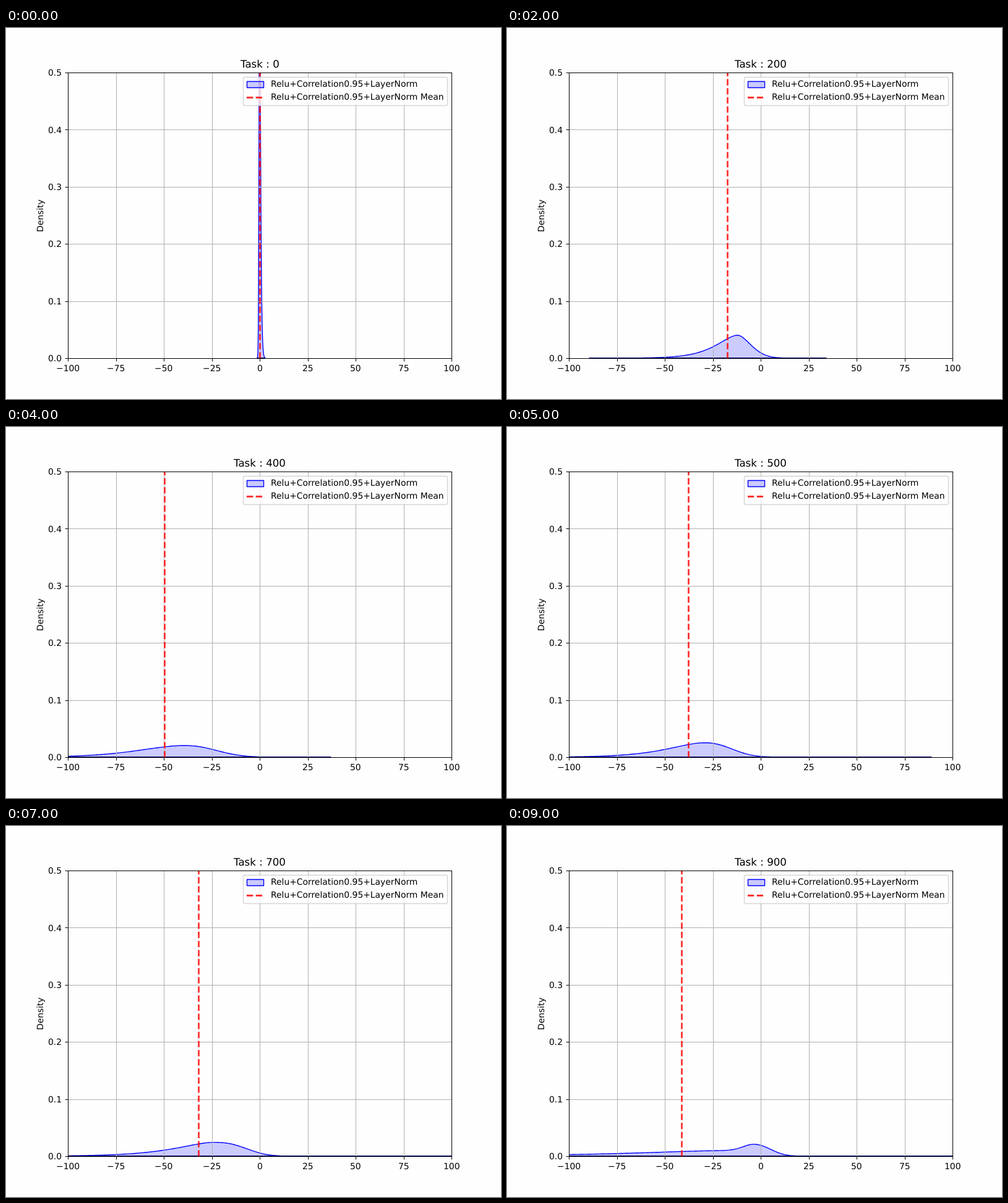
An HTML page that plays this animation: 800x600 px, repeating every 10 s.

```html
<!DOCTYPE html>
<html lang="en">
<head>
<meta charset="utf-8">
<title>Density by task</title>
<style>
  html, body { margin: 0; width: 100%; height: 100%; overflow: hidden; background: #fefefe; }
  svg { display: block; width: 800px; height: 600px; }
  text { font: 13.89px "DejaVu Sans", sans-serif; text-rendering: geometricPrecision; }
  #title { font-size: 16.67px; }
  #grid { stroke: #b0b0b0; }
  #ticks, #frame { stroke: #000; fill: none; }
  .density { fill: rgba(0, 0, 255, .2); stroke: #00f; stroke-width: 1.39; stroke-linejoin: round; }
  .mean { stroke: rgba(255, 0, 0, .8); stroke-width: 2.78; stroke-dasharray: 10.28 4.44; }
  #floor { stroke: #00006a; }
  #box { fill: #fefefe; stroke: #ccc; stroke-width: 1.39; opacity: .8; }
</style>
</head>
<body>
<svg viewBox="0 0 800 600">
  <clipPath id="plot"><rect x="100" y="72" width="620" height="462"/></clipPath>
  <g clip-path="url(#plot)"><path id="curve" class="density"/><path id="floor"/></g>
  <path id="grid"/>
  <path id="ticks"/>
  <g clip-path="url(#plot)"><path id="mean" class="mean"/></g>
  <rect id="frame" x="100.5" y="72.5" width="620" height="462"/>
  <g id="labels"></g>
  <text id="title" y="64"></text>
  <g transform="translate(60 330) rotate(-90)"><text>Density</text></g>
  <rect id="box" x="383.5" y="79.5" width="330" height="46" rx="2.8"/>
  <rect class="density" x="389.5" y="86.5" width="27" height="10"/>
  <path class="mean" d="M389 112.5H416.7"/>
  <text x="428" y="95">Relu+Correlation0.95+LayerNorm</text>
  <text x="428" y="116">Relu+Correlation0.95+LayerNorm Mean</text>
</svg>
<script>
const $ = id => document.getElementById(id);
const BASE = 534;
const crisp = v => Math.floor(v + .5) + .5;

// Aligns text around x (.5 centres, 1 right-aligns) and starts it on a whole pixel.
function align(el, x, share) {
  el.setAttribute('x', Math.round(x - share * el.getComputedTextLength()));
}

function addLabel(content, x, y, share) {
  const el = document.createElementNS('http://www.w3.org/2000/svg', 'text');
  el.textContent = content;
  el.setAttribute('y', y);
  $('labels').append(el);
  align(el, x, share);
}

function drawAxes() {
  let grid = '', ticks = '';
  for (let i = 0; i <= 8; i++) {
    const x = 100 + 77.5 * i;
    if (i % 8) grid += `M${crisp(x)} 72V534`;
    ticks += `M${crisp(x)} 534.5v4.9`;
    addLabel(String(25 * i - 100).replace('-', '\u2212'), x, 555, .5);
  }
  for (let i = 0; i <= 5; i++) {
    const y = BASE - 92.4 * i;
    if (i % 5) grid += `M100 ${crisp(y)}H720`;
    ticks += `M100.5 ${crisp(y)}h-4.9`;
    addLabel((i / 10).toFixed(1), 90.3, Math.round(y + 5.2), 1);
  }
  $('grid').setAttribute('d', grid);
  $('ticks').setAttribute('d', ticks);
}

// A skewed bell: "stretch" thickens the left tail, "power" shapes the right flank.
function bell(x, [mode, height, left, stretch, right, power]) {
  const d = Math.abs(x - mode);
  return height * Math.exp(x < mode ? -d * d / (left * left + stretch * d) : -((d / right) ** power));
}

function outline(bells, start, end) {
  let d = `M${start} ${BASE}`;
  for (let i = 0; i <= 200; i++) {
    const x = start + (end - start) * i / 200;
    const height = bells.reduce((sum, b) => sum + bell(x, b), 0);
    d += `L${x.toFixed(2)} ${(BASE - height).toFixed(2)}`;
  }
  return d + `V${BASE}Z`;
}

const midway = (a, b) => a.map((v, i) => (v + b[i]) / 2);

const spike = [410, 700, 1.41, 0, 1.95, 1.3];
const early = [372, 39.5, 35, 22, 31, 2];
const settled = [374, 34.8, 36, 30, 29, 1.46];
const shifted = [288, 18.8, 87, 35, 68.5, 2.25];
const returning = [350, 27.9, 40, 45, 46, 2.3];
const wide = [321, 16.8, 81, 57, 83, 2.9];
const plateau = [350, 9, 134, 130, 70, 3];
const bump = [403, 13.3, 27, 0, 34, 2.1];

const step = (mean, start, end, ...bells) => ({ mean, start, end, path: outline(bells, start, end) });
const steps = [
  step(410.5, 406, 418.5, spike),
  step(358.5, 90, 494, early),
  step(356.5, 133, 516, midway(early, settled)),
  step(354.5, 150, 604, settled),
  step(256.5, 90, 525, shifted),
  step(293.5, 90, 686, midway(shifted, returning)),
  step(328.5, 90, 542, returning),
  step(311.5, 90, 730, midway(returning, wide)),
  step(293.5, 90, 635, wide),
  step(282.5, 90, 730, plateau, bump)
];

let shown = -1;
function render() {
  const i = Math.floor(performance.now() / 1000) % steps.length;
  if (i !== shown) {
    shown = i;
    const { mean, start, end, path } = steps[i];
    $('title').textContent = `Task : ${i * 100}`;
    align($('title'), 410, .5);
    $('curve').setAttribute('d', path);
    $('floor').setAttribute('d', `M${start} 533.5H${end}`);
    $('mean').setAttribute('d', `M${mean} 534.5V72`);
  }
  requestAnimationFrame(render);
}

drawAxes();
render();
</script>
</body>
</html>
```
